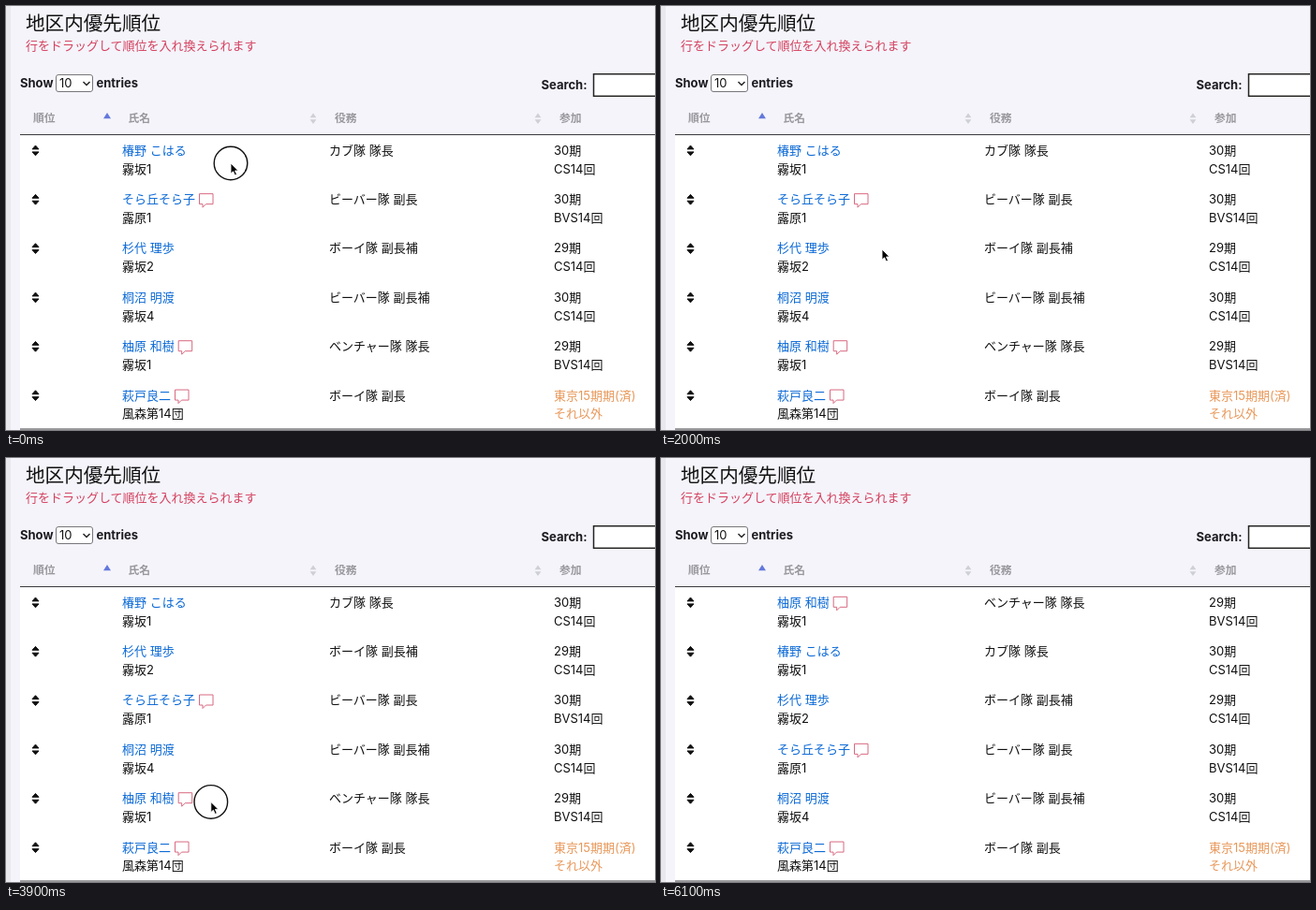
An HTML page that plays this animation: 693 by 453 pixels, repeating every 6.3 s.

```html
<!DOCTYPE html>
<html lang="ja">
<head>
<meta charset="utf-8">
<style>
html, body { margin: 0; width: 100%; height: 100%; overflow: hidden; background: #f4f4fa; }
svg { display: block; width: 693px; height: 453px; }
text { font: 13px Inter, "Noto Sans CJK JP", sans-serif; fill: #111; white-space: pre; }
.title { font-size: 20.6px; font-weight: 500; }
.note { fill: #d5405f; }
.bold { font-weight: 700; fill: #1c1c20; }
.head { font-size: 11.8px; font-weight: 700; fill: #98989d; }
.link { fill: #0b69d6; }
.warn { fill: #e8985a; }
.rule { stroke: #3a3a3e; stroke-width: 1; }
.icon { fill: none; stroke: #d86880; stroke-width: 1; stroke-linejoin: round; }
</style>
</head>
<body>
<svg id="stage" viewBox="0 0 693 453" xmlns="http://www.w3.org/2000/svg">
  <rect width="693" height="453" fill="#f4f4fa"/>
  <rect width="5" height="453" fill="#e8e8ee"/>

  <text class="title" x="21" y="25.6">地区内優先順位</text>
  <text class="note" x="21" y="46.9">行をドラッグして順位を入れ換えられます</text>

  <text class="bold" x="15" y="87.3">Show</text>
  <rect x="53.5" y="73.5" width="39" height="18" rx="2.5" fill="#fff" stroke="#77777b"/>
  <text x="57" y="87.2">10</text>
  <path d="M82.5 81l3.5 3.6 3.5-3.6" fill="none" stroke="#222" stroke-width="1.4"/>
  <text class="bold" x="96.5" y="87.3">entries</text>
  <text class="bold" x="571.5" y="89.3">Search:</text>
  <rect x="627.5" y="72.7" width="80" height="23.6" fill="#fff" stroke="#222" stroke-width="1.5"/>

  <text class="head" x="29" y="124">順位</text>
  <text class="head" x="130.5" y="124">氏名</text>
  <text class="head" x="351" y="124">役務</text>
  <text class="head" x="591" y="124">参加</text>
  <path d="M104 120.3l4-6.3 4 6.3z" fill="#6478dc"/>
  <path id="sorts" fill="#cfcfd6"/>

  <rect id="sheet" x="15" y="138" width="678" fill="#fff"/>
  <rect id="gap" x="15" width="678" fill="#f4f4fa"/>
  <g id="rows"></g>
  <path class="rule" d="M15 137.5H693"/>
  <g id="foot">
    <path class="rule" d="M15 452H693"/>
    <text x="15" y="476.5">Showing 1 to 6 of 6 entries</text>
    <text x="621" y="477.5" style="fill:#6b6b70">Previous</text>
    <rect x="687.5" y="457.5" width="30" height="30" rx="2" fill="#efeff3" stroke="#a0a0a6"/>
  </g>
  <g id="helpers"></g>

  <g id="pointer">
    <circle id="ring" fill="#fff" fill-opacity=".25" stroke="#111" stroke-width="1.4"/>
    <path id="arrow" d="M0 0V11.2L2.6 8.8 4.5 13 6.5 12.1 4.6 8H8.1Z" fill="#000" stroke="#fff" stroke-width=".9"/>
    <path id="move" d="M0-6L2.4-3H.8V-.8H3V-2.4L6 0 3 2.4V.8H.8V3H2.4L0 6-2.4 3H-.8V.8H-3V2.4L-6 0-3-2.4V-.8H-.8V-3H-2.4Z"
      fill="#000" stroke="#fff" stroke-width="1" paint-order="stroke"/>
  </g>
</svg>
<script>
const LOOP = 6300, STEP = 100;
const TOP = 138, ROW = 52.35, GAP = 32.6;
const $ = id => document.getElementById(id);

// name, group, comment icon, role, term, sessions
const people = [
  ['椿野 こはる', '霧坂1', 0, 'カブ隊 隊長', '30期', 'CS14回'],
  ['そら丘そら子', '露原1', 1, 'ビーバー隊 副長', '30期', 'BVS14回'],
  ['杉代 理歩', '霧坂2', 0, 'ボーイ隊 副長補', '29期', 'CS14回'],
  ['桐沼 明渡', '霧坂4', 0, 'ビーバー隊 副長補', '30期', 'CS14回'],
  ['柚原 和樹', '霧坂1', 1, 'ベンチャー隊 隊長', '29期', 'BVS14回'],
  ['萩戸良二', '風森第14団', 1, 'ボーイ隊 副長', '東京15期期(済)', 'それ以外']
];

// slots: [time, placeholder index]
const drags = [
  { row: 0, press: 0, start: 200, end: 1400, slots: [[200, 0], [500, 1], [700, 2], [1000, 1], [1200, 0]] },
  { row: 2, press: 2100, start: 2200, end: 2700, slots: [[2200, 2], [2500, 1]] },
  { row: 4, press: 3800, start: 4000, end: 5100, slots: [[4000, 4], [4300, 3], [4400, 2], [4500, 1], [4700, 0]] }
];

// time, x, y of the pointer
const path = [
  [0, 240, 168], [100, 240, 168], [400, 257.5, 200], [800, 258, 288], [1300, 243, 172],
  [1500, 242, 172], [2000, 236, 260], [2150, 236, 261], [2600, 251, 190], [2900, 251, 189],
  [3700, 218.8, 367.4], [3950, 218.8, 367.4], [4200, 226, 345], [4700, 226.6, 160], [4800, 226.6, 157.7],
  [LOOP, 226.6, 157.7]
];
const HIDE = 5700;

function add(parent, tag, attrs, label) {
  const el = document.createElementNS('http://www.w3.org/2000/svg', tag);
  for (const k in attrs) el.setAttribute(k, attrs[k]);
  if (label) el.textContent = label;
  return parent.appendChild(el);
}

// Row drawn with its top at 0; compact rows shrink columns to their content.
function makeRow(parent, p, compact) {
  const [name, group, icon, role, term, sessions] = p;
  const g = add(parent, 'g', {});
  if (compact) add(g, 'rect', { x: 15, width: 800, height: ROW, fill: '#fff' });
  add(g, 'path', {
    d: 'M28 14.9L31.5 11 35 14.9ZM28 17.9L31.5 21.8 35 17.9Z',
    fill: '#111', stroke: '#111', 'stroke-width': 1, 'stroke-linejoin': 'round'
  });
  const put = (x, y, s, cls = '') => add(g, 'text', { x, y, class: cls }, s).getComputedTextLength();
  const nameX = compact ? 52 : 124;
  let w = put(nameX, 20.8, name, 'link');
  if (icon) {
    add(g, 'path', {
      class: 'icon',
      d: 'M.5.5H15V11.5H7.5L4 15V11.5H.5Z',
      transform: `translate(${nameX + w + 4} 9.8)`
    });
    w += 20;
  }
  w = Math.max(w, put(nameX, 40.6, group));
  const roleX = compact ? nameX + w + 16.5 : 345;
  w = put(roleX, 20.8, role);
  const termX = compact ? roleX + w + 16.5 : 585;
  const cls = term.length > 3 ? 'warn' : '';
  put(termX, 20.8, term, cls);
  put(termX, 40.6, sessions, cls);
  return g;
}

const rows = people.map(p => makeRow($('rows'), p, false));
const helpers = drags.map(d => {
  const g = makeRow($('helpers'), people[d.row], true);
  g.setAttribute('opacity', .62);
  return g;
});
$('sorts').setAttribute('d', [328, 568].map(x =>
  `M${x - 3.4} 119.3l3.4-4.8 3.4 4.8zM${x - 3.4} 121.2l3.4 4.8 3.4-4.8z`).join(''));

const slope = (i, k) => (path[i + 1][k] - path[i][k]) / (path[i + 1][0] - path[i][0]);

function tangent(i, k) {
  if (i === 0 || i === path.length - 1) return 0;
  const a = slope(i - 1, k), b = slope(i, k);
  return a * b > 0 ? 2 * a * b / (a + b) : 0;
}

// Smooth curve through the pointer keys without overshoot.
function pointerAt(t) {
  let i = 0;
  while (i < path.length - 2 && path[i + 1][0] <= t) i++;
  const a = path[i], b = path[i + 1], h = b[0] - a[0], u = (t - a[0]) / h;
  return [1, 2].map(k => {
    const s = u * u * (3 - 2 * u);
    return a[k] + (b[k] - a[k]) * s
      + h * u * (1 - u) * ((1 - u) * tangent(i, k) - u * tangent(i + 1, k));
  });
}

const shift = (el, x, y) => el.setAttribute('transform', `translate(${x} ${y})`);
const show = (el, on) => el.setAttribute('display', on ? 'inline' : 'none');

function draw(t) {
  const order = people.map((_, i) => i);
  const [px, py] = pointerAt(t);
  let slot = -1, held = -1, pressed = false;

  drags.forEach((d, i) => {
    const on = t >= d.start && t < d.end;
    pressed = pressed || (t >= d.press && t < d.end);
    show(helpers[i], on);
    if (t < d.start) return;
    const from = order.indexOf(d.row);
    const to = d.slots.filter(s => s[0] <= t).pop()[1];
    order.splice(from, 1);
    order.splice(to, 0, d.row);
    if (on) {
      const [x0, y0] = pointerAt(d.press);
      slot = to;
      held = d.row;
      shift(helpers[i], px - x0, TOP + from * ROW + py - y0);
    }
  });

  let y = TOP;
  order.forEach(r => {
    show(rows[r], r !== held);
    shift(rows[r], 0, y);
    y += r === held ? GAP : ROW;
  });
  $('sheet').setAttribute('height', y - TOP);
  show($('gap'), slot >= 0);
  $('gap').setAttribute('y', TOP + Math.max(slot, 0) * ROW);
  $('gap').setAttribute('height', GAP);
  shift($('foot'), 0, held < 0 ? 0 : GAP - ROW);

  show($('pointer'), t < HIDE);
  shift($('pointer'), px, py);
  show($('ring'), pressed);
  $('ring').setAttribute('r', held < 0 ? 17.8 : 15.5);
  show($('arrow'), held < 0);
  show($('move'), held >= 0);
}

const began = performance.now();
function tick() {
  const t = (performance.now() - began) % LOOP;
  draw(Math.floor(t / STEP) * STEP);
  requestAnimationFrame(tick);
}
tick();
</script>
</body>
</html>
```
